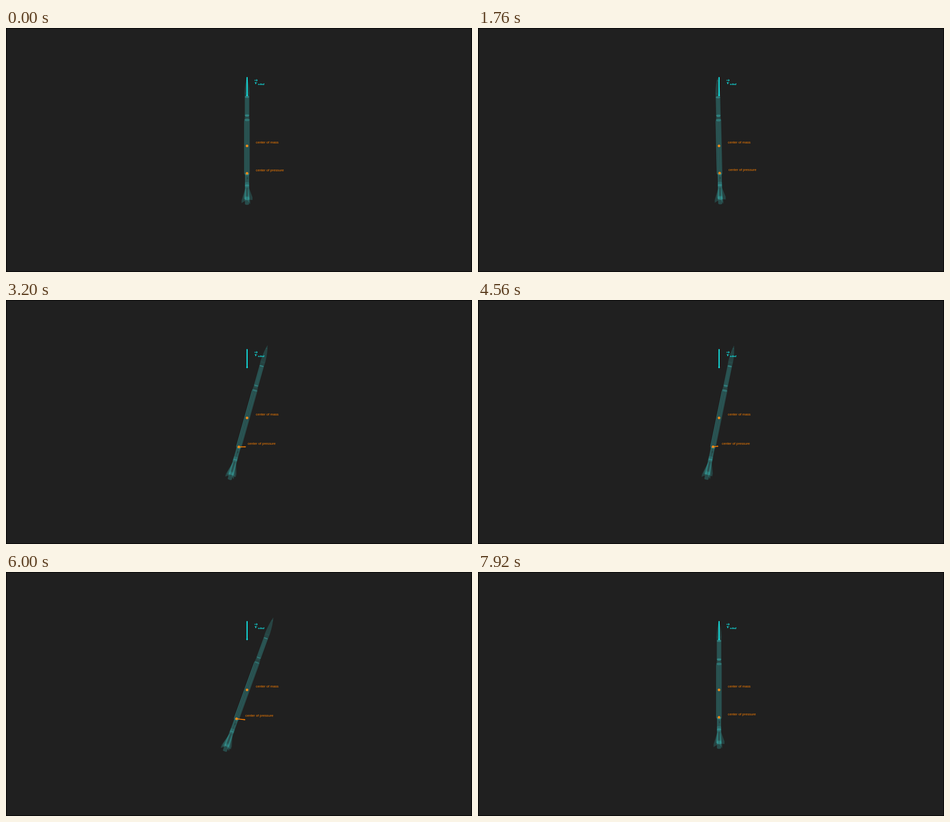
Write an HTML page with a canvas that moves like this. It is 1032 px wide and 543 px high and loops after 8 s.

```html
<!DOCTYPE html>
<html lang="en">
<head>
<meta charset="utf-8">
<title>Rocket in the wind</title>
<style>
  html, body { margin: 0; width: 100%; height: 100%; overflow: hidden; background: #202020; }
  canvas, svg { position: absolute; left: 0; top: 0; width: 1032px; height: 543px; }
  .label { font: 7.7px "Liberation Sans", Arial, sans-serif; fill: #ff8000; }
  .wind { font: italic bold 11px "Liberation Serif", "Times New Roman", serif; fill: #10f4f4; }
  .wind .sub { font-size: 7px; }
</style>
</head>
<body>
<canvas id="stage" width="1032" height="543"></canvas>
<svg viewBox="0 0 1032 543">
  <g class="wind">
    <text x="551" y="125">v</text>
    <text class="sub" x="558" y="126.7">wind</text>
    <path d="M550 116.3H556.6M554.4 114.1L556.9 116.3L554.4 118.5" fill="none" stroke="#10f4f4" stroke-width="1"/>
  </g>
  <text class="label" x="553.3" y="257.4">center of mass</text>
  <text class="label" id="cop">center of pressure</text>
</svg>
<script>
const ctx = document.getElementById('stage').getContext('2d');
const copLabel = document.getElementById('cop');
const TAU = Math.PI * 2, RAD = Math.PI / 180;
const STEP = 80, FRAMES = 100;
const COM = [533.8, 262.3];
const ELEV = 30 * RAD;               // camera elevation
const LEN = 1 / Math.cos(ELEV);      // true length of one upright pixel
const PLANE = 37 * RAD;              // azimuth of the swing plane
const SWING = 45 * RAD;
const COP_ARM = 61, FORCE = 58;
const CYAN = '#10f4f4', ORANGE = '#ff8000';
const teal = a => `rgba(64,208,204,${a})`;

// Three-space (x right, y away, z up) to screen offset
const project = ([x, y, z]) => [x, -(z * Math.cos(ELEV) + y * Math.sin(ELEV))];

// Four swings, eased over the whole loop
function angleAt(frame) {
  const u = frame / (FRAMES - 1);
  return SWING * Math.sin(4 * TAU * u * u * (3 - 2 * u));
}

function pose(th) {
  const c = Math.cos(th), s = Math.sin(th), cp = Math.cos(PLANE), sp = Math.sin(PLANE);
  const axis = project([s * cp, s * sp, c]).map(v => v * LEN);
  // unit radial direction of the hull at azimuth a, in degrees
  const radial = a => {
    const i = Math.cos(a * RAD - PLANE), j = Math.sin(a * RAD - PLANE);
    return project([i * c * cp - j * sp, i * c * sp + j * cp, -i * s]);
  };
  const at = (h, r = 0, a = 0) => {
    const q = radial(a);
    return [COM[0] + axis[0] * h + q[0] * r, COM[1] + axis[1] * h + q[1] * r];
  };
  return { axis, at, cos: c };
}

function fillPoly(pts, color) {
  ctx.fillStyle = color;
  ctx.beginPath();
  pts.forEach(p => ctx.lineTo(...p));
  ctx.closePath();
  ctx.fill();
}

function line(a, b, width, color) {
  ctx.strokeStyle = color;
  ctx.lineWidth = width;
  ctx.beginPath();
  ctx.moveTo(...a);
  ctx.lineTo(...b);
  ctx.stroke();
}

function dot([x, y], r, color) {
  ctx.fillStyle = color;
  ctx.beginPath();
  ctx.arc(x, y, r, 0, TAU);
  ctx.fill();
}

function arrow(a, b, width, color) {
  const dx = b[0] - a[0], dy = b[1] - a[1], n = Math.hypot(dx, dy);
  if (n < 3) return;
  const ux = dx / n, uy = dy / n;
  const base = [b[0] - ux * 3.6, b[1] - uy * 3.6], w = width * 0.95;
  line(a, base, width, color);
  fillPoly([[base[0] - uy * w, base[1] + ux * w], b, [base[0] + uy * w, base[1] - ux * w]], color);
}

function drawRocket({ axis, at }) {
  const k = Math.hypot(...axis);
  const flat = Math.sqrt(Math.max(0, 1 - (k / LEN) ** 2));

  // Fins
  for (let a = 30; a < 390; a += 90)
    fillPoly([at(-92, 4, a), at(-118, 14, a), at(-124, 14, a), at(-121, 4, a)], teal(0.2));

  ctx.save();
  ctx.translate(...COM);
  ctx.rotate(Math.atan2(axis[0], -axis[1]));

  const tube = (h0, h1, r0, r1, alpha) => {
    ctx.fillStyle = teal(alpha);
    ctx.beginPath();
    ctx.ellipse(0, -h0 * k, r0, r0 * flat, 0, Math.PI, TAU);
    ctx.ellipse(0, -h1 * k, r1, r1 * flat, 0, 0, Math.PI);
    ctx.closePath();
    ctx.fill();
  };
  const ring = (h, r, alpha) => {
    ctx.fillStyle = teal(alpha);
    ctx.beginPath();
    ctx.ellipse(0, -h * k, r, r * flat, 0, 0, TAU);
    ctx.fill();
  };

  // Nose cone
  ctx.fillStyle = teal(0.2);
  ctx.beginPath();
  ctx.moveTo(0, -153 * k);
  ctx.quadraticCurveTo(4.6, -139 * k, 5.4, -119 * k);
  ctx.lineTo(5, -109 * k);
  ctx.ellipse(0, -109 * k, 5, 5 * flat, 0, 0, Math.PI);
  ctx.lineTo(-5.4, -119 * k);
  ctx.quadraticCurveTo(-4.6, -139 * k, 0, -153 * k);
  ctx.fill();
  ring(146, 1.8, 0.2);
  ring(117, 5, 0.05);

  tube(109, 68, 5, 5, 0.28);        // upper stage
  ring(109, 4.6, 0.18);
  ring(68, 5, 0.24);
  tube(67, 58, 4.8, 5.6, 0.2);      // interstage
  ring(65, 4, 0.12);
  ring(57, 5.4, 0.14);
  tube(58, -62, 6, 6, 0.25);        // main stage
  ring(-64, 4.6, 0.16);
  tube(-62, -88, 4.6, 4.6, 0.28);   // engine section
  tube(-83, -91, 4.9, 4.9, 0.16);
  tube(-88, -118, 4.7, 5.4, 0.28);
  ring(-114, 5, 0.13);
  ring(-119, 5, 0.13);
  tube(-116, -129, 4.8, 4.6, 0.25);
  ctx.restore();

  // Lengthwise ribs and cable ducts
  line(at(57, 6.4, 205), at(-61, 6.4, 205), 0.9, teal(0.3));
  for (const a of [45, 115, 245, 290])
    line(at(56, 4.2, a), at(-60, 4.2, a), 0.9, teal(0.1));
  for (const a of [70, 250])
    line(at(106, 3, a), at(70, 3, a), 1.2, teal(0.06));
  for (const a of [20, 200])
    line(at(-64, 2.6, a), at(-118, 2.6, a), 1.3, teal(0.16));
  line(at(-70, 1), at(-74, 1), 2.6, 'rgba(30,50,50,.5)');
}

function draw(frame) {
  const p = pose(angleAt(frame));
  ctx.fillStyle = '#202020';
  ctx.fillRect(0, 0, 1032, 543);
  ctx.strokeStyle = '#000';
  ctx.lineWidth = 2;
  ctx.strokeRect(0.2, 0.2, 1031.6, 542.6);

  drawRocket(p);
  arrow([533.9, 109.3], [533.9, 152.6], 2.3, CYAN);

  // Wind load across the hull: the part of the wind normal to the axis
  const cop = p.at(-COP_ARM);
  const tip = [cop[0] + FORCE * p.cos * p.axis[0], cop[1] + FORCE * (p.cos * p.axis[1] + 1)];
  arrow(cop, tip, 1.9, ORANGE);
  dot(COM, 2.9, '#ea8a1c');
  dot(cop, 2.9, '#ea8a1c');
  copLabel.setAttribute('transform', `translate(${cop[0] + 19.5} ${cop[1] - 4.7})`);
}

function tick(now) {
  draw(Math.floor(now / STEP) % FRAMES);
  requestAnimationFrame(tick);
}
draw(0);
requestAnimationFrame(tick);
</script>
</body>
</html>
```
